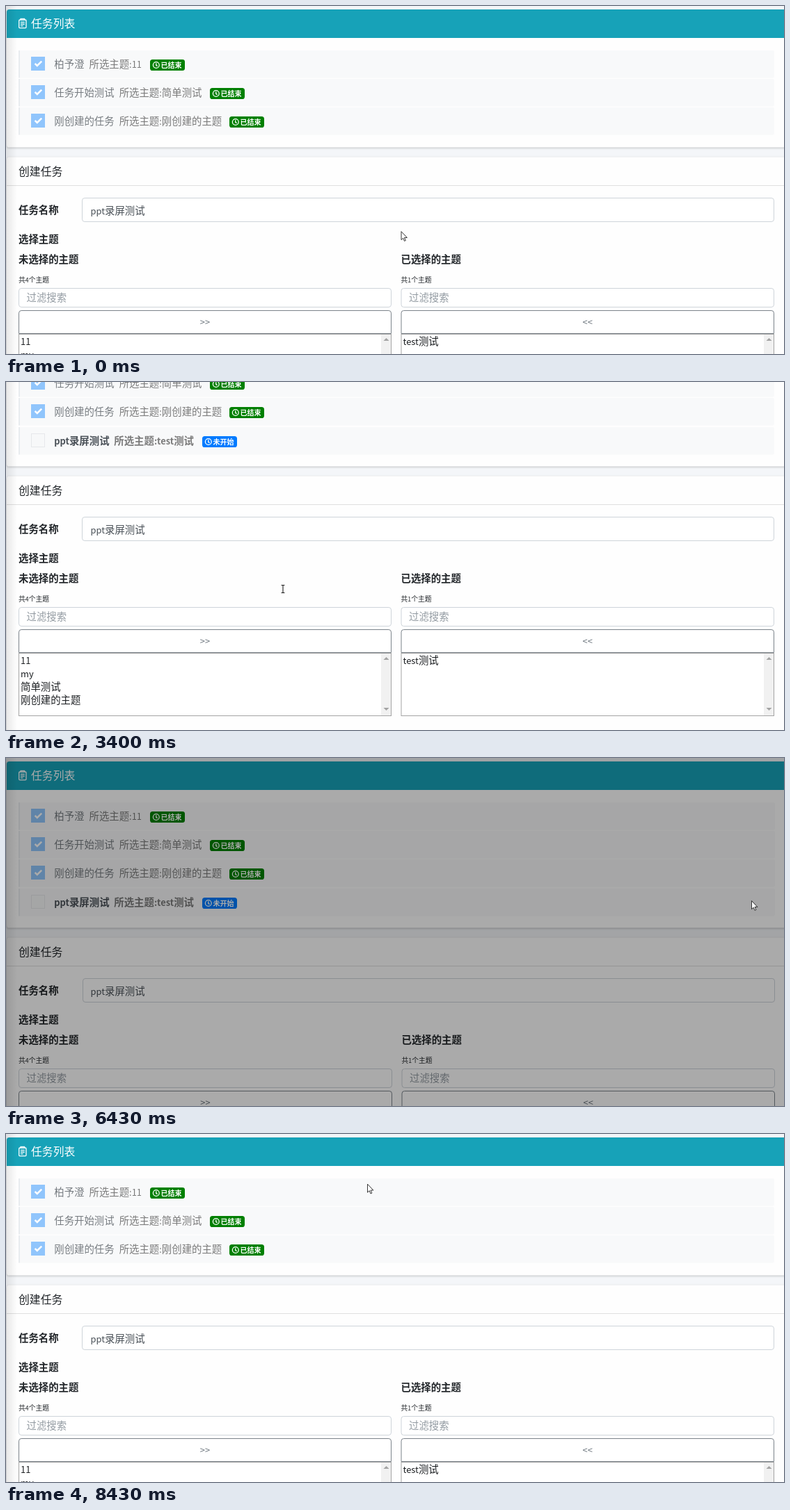
These frames come from a looping animation (1118 px wide and 501 px high, 9810 ms). An HTML page:

```html
<!DOCTYPE html>
<html lang="zh">
<head>
<meta charset="utf-8">
<style>
html, body { margin: 0; width: 100%; height: 100%; overflow: hidden; background: #f4f6f9; }
svg { display: block; width: 1118px; height: 501px; }
text { font-family: "Noto Sans CJK SC", "Noto Sans CJK", sans-serif; white-space: pre; }
.card { filter: drop-shadow(0 1px 1.5px rgba(0,0,0,.22)); }
.dialog { filter: drop-shadow(0 7px 7px rgba(0,0,0,.5)); }
</style>
</head>
<body>
<svg viewBox="0 0 1118 501" xmlns="http://www.w3.org/2000/svg">
  <defs>
    <linearGradient id="edge"><stop offset="0" stop-opacity=".09"/><stop offset="1" stop-opacity="0"/></linearGradient>
  </defs>
  <rect width="1118" height="501" fill="#f4f6f9"/>
  <g id="page"></g>
  <rect width="16" height="501" fill="url(#edge)"/>
  <rect id="shade" width="1118" height="501"/>
  <g id="modal"></g>
  <circle id="click" r="10.5" fill="#ffb400" fill-opacity=".75"/>
  <g id="cursor" stroke-linejoin="round" stroke-linecap="round"></g>
</svg>
<script>
const LOOP = 9810, SCROLL = 154;
const $ = id => document.getElementById(id);
const esc = s => s.replace(/&/g, '&amp;').replace(/</g, '&lt;').replace(/>/g, '&gt;');

// Text centred vertically on cy; Latin runs are set a little smaller than the Han glyphs.
function text(x, cy, s, fill = '#212529', { size = 14.4, bold, anchor = 'start' } = {}) {
  const runs = s.replace(/[\x20-\x7e]+/g, m => `<tspan font-size="${(size * .895).toFixed(2)}">${esc(m)}</tspan>`);
  return `<text x="${x}" y="${cy + size * .38}" font-size="${size}" fill="${fill}" text-anchor="${anchor}"` +
    `${bold ? ' font-weight="700"' : ''}>${runs}</text>`;
}

const rect = (x, y, w, h, fill, r = 0, extra = '') =>
  `<rect x="${x}" y="${y}" width="${w}" height="${h}" rx="${r}" fill="${fill}" ${extra}/>`;
const box = (x, y, w, h, stroke, fill = '#fff', r = 3.6) => rect(x + .5, y + .5, w - 1, h - 1, fill, r, `stroke="${stroke}"`);
const path = (d, fill, extra = '') => `<path d="${d}" fill="${fill}" ${extra}/>`;

const TASKS = [
  { name: '柏予澄', topic: '11', topicX: 119.5, badgeX: 207 },
  { name: '任务开始测试', topic: '简单测试', topicX: 162.7, badgeX: 293 },
  { name: '刚创建的任务', topic: '刚创建的主题', topicX: 162.7, badgeX: 321 },
  { name: 'ppt录屏测试', topic: 'test测试', topicX: 155.3, badgeX: 282, open: true }
];
const rowY = i => 64 + Math.round(41.2 * i);

function badge(x, y, label, fill) {
  return rect(x, y, 50, 16, fill, 3.6) +
    `<g fill="none" stroke="#fff" stroke-width="1.3"><circle cx="${x + 8.8}" cy="${y + 8}" r="4.4"/>` +
    `<path d="M${x + 8.8} ${y + 5.2}v3.2l1.8 1.2"/></g>` +
    text(x + 15.4, y + 8.2, label, '#fff', { size: 10.08, bold: true });
}

function taskRow(task, i, wide) {
  const y = rowY(i), bold = task.open;
  const check = bold
    ? box(36, y + 9, 20, 20, '#e6e8eb', '#f7f8f9', 0)
    : rect(36, y + 9, 20, 20, '#90c5fc') +
      path(`M41.6 ${y + 18.8}l3.2 3.2l6.4 -6.4`, 'none', 'stroke="#fff" stroke-width="2.5"');
  return rect(18, y, 1086 + wide, 39.5, '#f8f9fa', 2) + rect(18, y, 2, 39.5, '#e9ecef') + check +
    text(69.3, y + 20, task.name, bold ? '#495057' : '#777c81', { bold }) +
    text(task.topicX, y + 20, '所选主题:' + task.topic, '#7a7a7a', { bold }) +
    badge(task.badgeX, y + 13, bold ? '未开始' : '已结束', bold ? '#007bff' : '#008000');
}

function actions() {
  const y = rowY(3) + 20;
  return `<g id="actions">` +
    path(`M988.5 ${y - 8}L974 ${y + .5}l3.6 1.6l8 -7l-6.2 8v3.9l2.5 -2.9l4 1.7z`, '#008000') +
    text(992.5, y - .5, '开始', '#008000', { bold: true }) +
    path(`M1037.5 ${y - 6.5}h3.6l1 -1.2h3.2l1 1.2h3.7v1.8h-12.5zM1038.4 ${y - 3.8}h10.7l-.8 9.2q-.1 1 -1.2 1h-6.7q-1 0 -1.2 -1z`, '#dc3545') +
    text(1054, y - .5, '删除', '#dc3545', { bold: true }) + `</g>`;
}

function picker(x, w, title, count, arrows, options) {
  const sx = x + w - 15, mid = sx + 7.5;
  return text(x, 364.5, title, '#212529', { bold: true }) +
    text(x, 394.3, `共${count}个主题`, '#212529', { size: 9.8 }) +
    box(x, 406, w, 28, '#ced4da') + text(x + 11.5, 420, '过滤搜索', '#939ba2') +
    box(x, 472, w, 91, '#a4a4a4', '#fff', 0) + rect(sx, 473, 14, 89, '#f1f1f1') +
    path(`M${mid - 4} 482l4 -4l4 4zM${mid - 4} 551l4 4l4 -4z`, '#a3a3a3') +
    options.map((o, i) => text(x + 3, 482.3 + 19 * i, o, '#1c1f22')).join('') +
    path(`M${x + .5} 471.5v-29.4q0 -3.6 3.6 -3.6h${w - 8.2}q3.6 0 3.6 3.6v29.4z`, '#fff', 'stroke="#7b838a"') +
    text(x + w / 2, 455, arrows, '#6c757d', { anchor: 'middle' });
}

function buildPage(count, wide) {
  const shift = rowY(count) - rowY(3);
  return rect(1, 5, 1140, 198.5 + shift, '#fefefe', 3.6, 'class="card"') +
    path('M1 46V8.6Q1 5 4.6 5H1118V46z', '#17a2b8') +
    `<g fill="none" stroke="#fff" stroke-width="1.3"><rect x="18.7" y="20" width="10.3" height="11.6" rx="1"/>` +
    `<path d="M21 20v-1.6h5.6v1.6M21 23.4h5.7M21 26h5.7M21 28.6h3.6"/></g>` +
    text(36, 25, '任务列表', '#fff', { size: 15.84 }) +
    TASKS.slice(0, count).map((task, i) => taskRow(task, i, wide)).join('') +
    (count > 3 ? actions() : '') +
    `<g transform="translate(0 ${shift})">` +
    rect(1, 217.5, 1140, 434.5, '#fefefe', 3.6, 'class="card"') +
    text(18, 238, '创建任务', '#212529', { size: 15.84 }) + rect(1, 258, 1117, 1, '#dfdfdf') +
    text(18, 294, '任务名称', '#212529', { bold: true }) +
    box(109 + wide, 276, 995, 35, '#ced4da') + text(121.5, 294.2, 'ppt录屏测试', '#495057') +
    text(18, 336, '选择主题', '#212529', { bold: true }) +
    picker(18, 536 + wide, '未选择的主题', 4, '>>', ['11', 'my', '简单测试', '刚创建的主题']) +
    picker(567.5 + wide, 536.5, '已选择的主题', 1, '<<', ['test测试']) +
    rect(1, 597, 1117, 55, '#f7f7f7') +
    rect(18, 608, 81, 33.5, '#17a2b8', 3.6, 'id="create"') + text(29.5, 624.8, '确认创建', '#fff') + `</g>`;
}

$('modal').innerHTML =
  rect(316, -60, 267, 165, '#fff', 4, 'class="dialog"') +
  text(331, 3, '确定删除任务') + text(419, 3, '"') + text(428, 3, 'ppt录屏测试') + text(509, 3, '"') + text(517.5, 3, '吗?') +
  rect(316, 41, 267, 1, '#e9ecef') +
  box(429, 56, 52, 34, '#dddfe2', '#f8f9fa') + text(440.5, 73.7, '取消', '#444') +
  rect(488, 56.5, 80, 33.5, '#dc3545', 3.6, 'id="del"') + text(499.3, 73.7, '确认删除', '#fff');

const CURSORS = {
  arrow: path('M0 0V11.6L2.7 9.2L4.5 13.4L6.3 12.6L4.5 8.5H8Z', '#fff', 'stroke="#222" stroke-width=".9"'),
  hand: path('M-1.6 1.4Q0 -.6 1.5 1.4V6L6 7Q8 7.4 8 9.4V12Q8 14 6.5 17.4H-.4Q-2 14.4 -3.8 11.2Q-4.4 9 -2.8 9.3L-1.6 10.5Z',
    '#fff', 'stroke="#222" stroke-width="1"') + path('M3.6 6.8v2.4M5.8 7.2v2.2', 'none', 'stroke="#222" stroke-width=".7"'),
  beam: path('M-2 -5.5H-.6L0 -5L.6 -5.5H2M0 -5V5M-2 5.5H-.6L0 5L.6 5.5H2', 'none', 'stroke="#222" stroke-width="1.1"')
};

// Fraction done after n picture changes spread evenly from a to b.
function step(t, a, b, n) {
  if (t < a) return 0;
  return Math.min(n, Math.floor((t - a) * (n - 1) / (b - a || 1) + 1.001)) / n;
}
const smooth = p => p * p * (3 - 2 * p);
const within = (v, a, b) => v >= a && v < b;

// start, end, steps, x, y
const MOVES = [
  [370, 370, 1, 566, 325.5],
  [830, 1530, 10, 33, 475],
  [1680, 1840, 3, 56, 475],
  [2790, 3030, 4, 394, 298],
  [3170, 3250, 2, 398, 298],
  [4330, 4330, 1, 397, 297],
  [4790, 5410, 9, 1010, 212],
  [5487, 5640, 3, 1075.5, 206],
  [5960, 6040, 2, 1071.5, 206],
  [6660, 7260, 9, 546, 149],
  [7340, 7730, 6, 519.5, 72.5]
];

function pointer(t) {
  let x = 568, y = 325;
  for (const [a, b, n, tx, ty] of MOVES) {
    const p = smooth(step(t, a, b, n));
    x += (tx - x) * p;
    y += (ty - y) * p;
  }
  return [x, y];
}

let pageKey, shape;
function render(t) {
  const [x, y] = pointer(t);
  const count = within(t, 2480, 8430) ? 4 : 3;
  const open = within(t, 6340, 8430);
  const key = count + (open ? 'w' : '');
  if (key !== pageKey) {
    $('page').innerHTML = buildPage(count, open ? 1 : 0);
    pageKey = key;
  }
  const scroll = Math.round(SCROLL * (step(t, 530, 680, 3) - step(t, 3400, 3720, 5)));
  $('page').setAttribute('transform', `translate(0 ${-scroll})`);

  const createY = 608 + rowY(count) - rowY(3) - scroll;
  const onCreate = within(x, 18, 99) && within(y, createY, createY + 34);
  $('create').setAttribute('fill', onCreate ? '#138496' : '#17a2b8');

  const onRow = count > 3 && !open && !scroll && within(y, 187, 228);
  if (count > 3) $('actions').setAttribute('visibility', onRow ? 'visible' : 'hidden');

  const leave = step(t, 8190, 8350, 3), enter = step(t, 6580, 6820, 4);
  const shown = Math.min(1, enter * 2) * (1 - leave);
  const lift = 45 * ((1 - enter) ** 2 + leave * leave);
  $('shade').setAttribute('opacity', .5 * step(t, 6340, 6500, 3) * (1 - step(t, 8350, 8430, 2)));
  $('modal').setAttribute('opacity', shown);
  $('modal').setAttribute('visibility', shown > 0 ? 'visible' : 'hidden');
  $('modal').setAttribute('transform', `translate(0 ${-lift})`);
  const onDelete = shown > 0 && within(x, 488, 568) && within(y, 56, 90);
  $('del').setAttribute('fill', onDelete ? '#c82333' : '#dc3545');

  const clicked = within(t, 2070, 2160) || within(t, 6190, 6340) || within(t, 8030, 8110);
  $('click').setAttribute('visibility', clicked ? 'visible' : 'hidden');
  $('click').setAttribute('transform', `translate(${x} ${y})`);

  const onAction = onRow && (within(x, 974, 1022) || within(x, 1037, 1084));
  const next = within(t, 3030, 4330) ? 'beam'
    : onAction || onDelete || (onCreate && t < 2400) ? 'hand' : 'arrow';
  if (next !== shape) $('cursor').innerHTML = CURSORS[shape = next];
  $('cursor').setAttribute('transform', `translate(${x} ${y})`);
}

const begin = performance.now();
function tick() {
  render((performance.now() - begin) % LOOP);
  requestAnimationFrame(tick);
}
tick();
</script>
</body>
</html>
```
